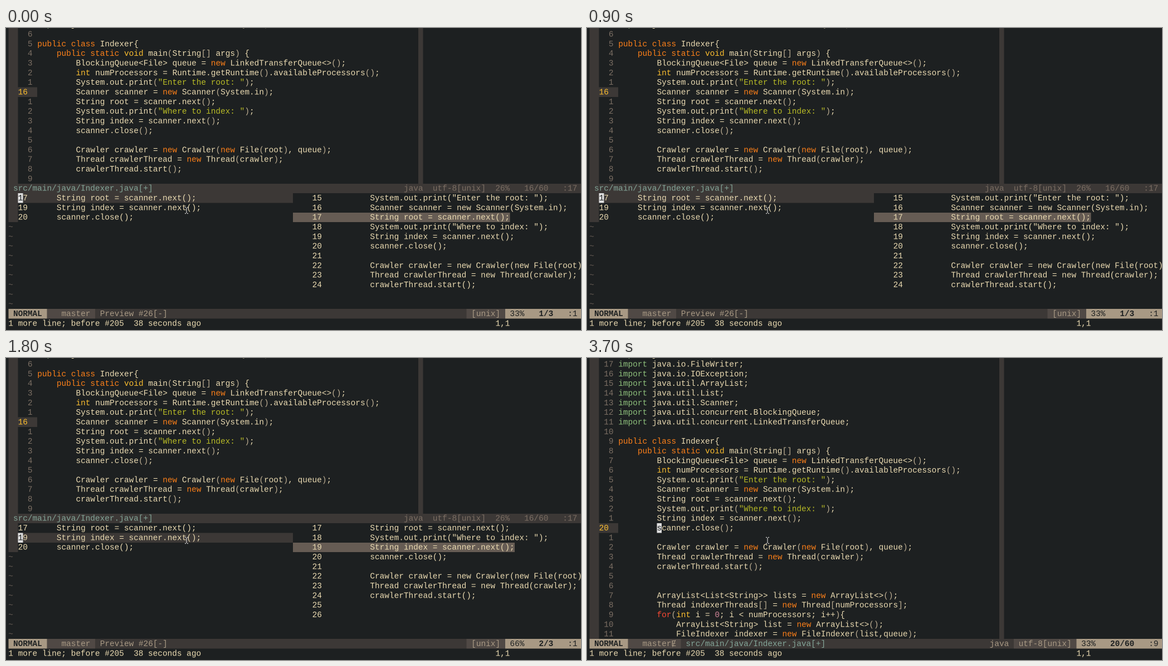
An HTML page with a canvas for the animation above (4.6 s loop, 1032 px wide and 543 px high).

```html
<!DOCTYPE html>
<html lang="en">
<head>
<meta charset="utf-8">
<title>Editor list preview</title>
<style>
  html, body { margin: 0; width: 1032px; height: 543px; overflow: hidden; background: #1d2021; }
  canvas { display: block; width: 1032px; height: 543px; }
</style>
</head>
<body>
<canvas id="stage" width="2064" height="1086"></canvas>
<script>
const ctx = document.getElementById('stage').getContext('2d');
// Drawn at double size so that text rows can sit between whole pixels
const SCALE = 2;
ctx.scale(SCALE, SCALE);

const LOOP = 4600, CELL_W = 8.655, CELL_H = 17.33, LEFT = 4.3, TOP = 2.5, BASELINE = 12.95;
const FONT = '14.425px "Liberation Mono", monospace';
const C = {
  bg: '#1d2021', bar: '#3c3836', mid: '#504945', select: '#665c54', dim: '#7c6f64',
  soft: '#a89984', paren: '#bdae93', fg: '#ebdbb2', orange: '#fe8019', yellow: '#fabd2f',
  green: '#b8bb26', aqua: '#8ec07c', red: '#fb4934', purple: '#d3869b', blue: '#83a598',
  cursor: '#dfdfdf'
};

const code = `
import java.io.File;
import java.io.FileWriter;
import java.io.IOException;
import java.util.ArrayList;
import java.util.List;
import java.util.Scanner;
import java.util.concurrent.BlockingQueue;
import java.util.concurrent.LinkedTransferQueue;

public class Indexer{
    public static void main(String[] args) {
        BlockingQueue<File> queue = new LinkedTransferQueue<>();
        int numProcessors = Runtime.getRuntime().availableProcessors();
        System.out.print("Enter the root: ");
        Scanner scanner = new Scanner(System.in);
        String root = scanner.next();
        System.out.print("Where to index: ");
        String index = scanner.next();
        scanner.close();

        Crawler crawler = new Crawler(new File(root), queue);
        Thread crawlerThread = new Thread(crawler);
        crawlerThread.start();


        ArrayList<List<String>> lists = new ArrayList<>();
        Thread indexerThreads[] = new Thread[numProcessors];
        for(int i = 0; i < numProcessors; i++){
            ArrayList<String> list = new ArrayList<>();
            FileIndexer indexer = new FileIndexer(list,queue);`.split('\n');
const lineAt = n => code[n - 1];

const matches = [17, 19, 20];
// Start time, selected match, previewed match
const steps = [
  [0, 0, 0], [200, 1, 1], [400, 2, 2], [700, 1, 2], [800, 1, 1], [900, 0, 0],
  [1300, 1, 1], [1500, 2, 2], [1800, 1, 1], [1900, 0, 1], [2000, 0, 0],
  [2300, 1, 1], [2400, 2, 2]
];
const CLOSE_TIME = 3700;

const snap = v => Math.round(v * SCALE) / SCALE;
const colX = col => LEFT + col * CELL_W;
const rowY = row => TOP + row * CELL_H;

function fill(color, row, from, to = 120, rows = 1) {
  const x = snap(colX(from)), y = snap(rowY(row));
  ctx.fillStyle = color;
  ctx.fillRect(x, y, snap(colX(to)) - x, snap(rowY(row + rows)) - y);
}

function text(str, row, col, color = C.fg, bold = false) {
  ctx.font = (bold ? 'bold ' : '') + FONT;
  ctx.fillStyle = color;
  ctx.fillText(str, colX(col), rowY(row) + BASELINE);
}

function tokenColor(token) {
  if (token[0] === '"') return C.green;
  if (/^[()[\]]/.test(token)) return C.paren;
  if (/^\d/.test(token)) return C.purple;
  if (token === 'import') return C.aqua;
  if (token === 'for') return C.red;
  if (/^(int|void)$/.test(token)) return C.yellow;
  return /^(public|class|static|new)$/.test(token) ? C.orange : C.fg;
}

function codeLine(str, row, col) {
  for (const m of str.matchAll(/"[^"]*"|[()[\]]+|\w+|[^\w\s"()[\]]+/g))
    text(m[0], row, col + m.index, tokenColor(m[0]));
}

function cursor(char, row, col) {
  fill(C.cursor, row, col, col + 1);
  text(char, row, col, C.bg);
}

function editor(current, currentRow, rows) {
  fill(C.bar, -1, 0, 2, rows + 1);
  fill(C.bar, -1, 85, 86, rows + 1);
  for (let row = -1; row < rows; row++) {
    const n = current + row - currentRow;
    if (row === currentRow) {
      fill(C.bar, row, 2, 6);
      text(String(n), row, 2, C.yellow);
    } else {
      text(String(Math.abs(row - currentRow)).padStart(3), row, 2, C.dim);
    }
    codeLine(lineAt(n), row, 6);
  }
}

function statusBar(branchEnd, encodingStart, positionStart) {
  fill(C.bar, 29, 0);
  fill(C.soft, 29, 0, 8);
  fill(C.mid, 29, 8, branchEnd);
  fill(C.mid, 29, encodingStart, positionStart);
  fill(C.soft, 29, positionStart);
  text('NORMAL', 29, 1, C.bg, true);
  text('master', 29, 11, C.soft);
}

function listView(selected, previewed) {
  editor(16, 6, 16);

  fill(C.bar, 16, 0);
  text('src/main/java/Indexer.java[+]', 16, 1, C.blue);
  text('java  utf-8[unix]  26%   16/60   :17', 16, 82, C.dim);

  fill(C.bar, 17, 0, 2, 3);
  fill(C.bar, 17 + selected, 2, 59);
  matches.forEach((n, i) => {
    text(String(n), 17 + i, 2);
    text(lineAt(n).trim(), 17 + i, 10);
  });
  cursor(String(matches[selected])[0], 17 + selected, 2);
  for (let row = 20; row < 29; row++) text('~', row, 0, C.select);

  const target = matches[previewed];
  fill(C.select, 19, 59, 67 + lineAt(target).length);
  for (let i = 0; i < 10; i++) {
    const n = target - 2 + i;
    text(String(n), 17 + i, 63);
    text(lineAt(n), 17 + i, 67);
  }

  const percent = ['33%', '66%', '100%'][previewed];
  const start = 106 - percent.length;
  statusBar(18, start - 8, start);
  text('Preview #26[-]', 29, 19, C.soft);
  text('[unix]', 29, start - 7, C.soft);
  text(percent, 29, start + 1, C.bg);
  text(`${previewed + 1}/3`, 29, 110, C.bg, true);
  text(':1', 29, 116, C.bg);
}

function fileView() {
  editor(20, 17, 29);
  cursor('s', 17, 14);
  statusBar(19, 88, 101);
  text('Ɇ', 29, 17, C.soft);
  text('src/main/java/Indexer.java[+]', 29, 20, C.blue);
  text('java', 29, 83, C.soft);
  text('utf-8[unix]', 29, 89, C.soft);
  text('33%', 29, 102, C.bg);
  text('20/60', 29, 108, C.bg, true);
  text(':9', 29, 116, C.bg);
}

function pointer() {
  ctx.strokeStyle = '#d0d0d0';
  ctx.lineWidth = 1.2;
  ctx.stroke(new Path2D('M321 322.5h2M325 322.5h2M324 323v10M321 333.5h2M325 333.5h2'));
}

function draw(now) {
  const t = now % LOOP;
  ctx.fillStyle = C.bg;
  ctx.fillRect(0, 0, 1032, 543);
  if (t >= CLOSE_TIME) {
    fileView();
  } else {
    const [, selected, previewed] = steps.findLast(step => step[0] <= t);
    listView(selected, previewed);
  }
  text('1 more line; before #205  38 seconds ago', 30, 0);
  text('1,1', 30, 101);
  pointer();
  requestAnimationFrame(draw);
}
requestAnimationFrame(draw);
</script>
</body>
</html>
```
